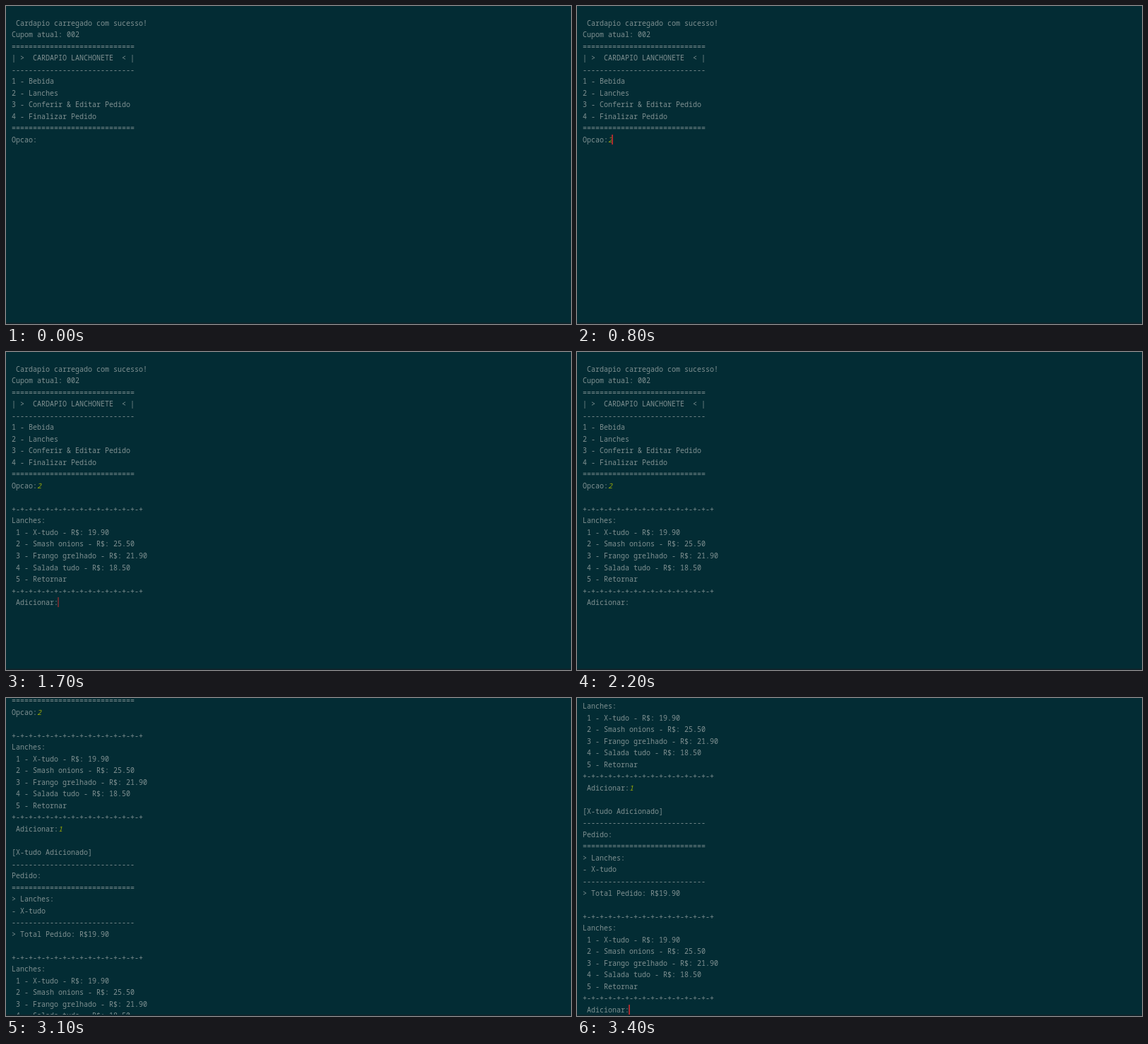
These frames come from a looping animation (800 by 450 pixels, 4000 ms). An HTML page:

```html
<!DOCTYPE html>
<html lang="pt">
<head>
<meta charset="utf-8">
<title>Cardapio</title>
<style>
  html, body { margin: 0; width: 100%; height: 100%; overflow: hidden; background: #032c34; }
  #view { position: absolute; left: 8px; top: 0; width: 792px; height: 450px; overflow: hidden; }
  #log {
    position: absolute; left: 0; margin: 0; color: #7f9091;
    font: 10px/16.53px "Noto Sans Mono", "DejaVu Sans Mono", monospace;
    font-variant-ligatures: none;
  }
  #log i { color: #98a808; }
  #caret { position: absolute; width: 2px; height: 14px; background: #a82c30; }
  #edge { position: absolute; left: 0; top: 448px; width: 800px; height: 2px; background: #10242b; }
</style>
</head>
<body>
<div id="view"><pre id="log"></pre><div id="caret"></div></div>
<div id="edge"></div>
<script>
const LOOP = 4000, ROW = 16.53, COL = 6, TOP = 15.5;
const log = document.getElementById('log');
const caret = document.getElementById('caret');

const double = '='.repeat(29), single = '-'.repeat(29), plus = '+-'.repeat(15) + '+';
const typed = key => `<i>${key}</i>`;

const menu = ` Cardapio carregado com sucesso!
Cupom atual: 002
${double}
| &gt;  CARDAPIO LANCHONETE  &lt; |
${single}
1 - Bebida
2 - Lanches
3 - Conferir &amp; Editar Pedido
4 - Finalizar Pedido
${double}
Opcao:`;

const snacks = `

${plus}
Lanches:
 1 - X-tudo - R$: 19.90
 2 - Smash onions - R$: 25.50
 3 - Frango grelhado - R$: 21.90
 4 - Salada tudo - R$: 18.50
 5 - Retornar
${plus}
 Adicionar:`;

const order = `

[X-tudo Adicionado]
${single}
Pedido:
${double}
&gt; Lanches:
- X-tudo
${single}
&gt; Total Pedido: R$19.90`;

const chosen = menu + typed(2);
const listed = chosen + snacks;
const added = listed + typed(1);
const full = added + order + snacks;

// Each step: start time, text, caret [row, column, opacity], scroll offset
const steps = [
  [0, menu],
  [100, menu, [10, 6, 1]],
  [700, chosen, [10, 7, 1]],
  [1400, chosen, [11, 0, 0.6]],
  [1500, chosen, [11, 0, 0.8]],
  [1700, listed, [20, 11, 0.6]],
  [1800, listed, [20, 11, 1]],
  [2200, listed],
  [2500, added, [20, 12, 1]],
  [2800, added, [21, 0, 0.6]],
  [2900, added, [21, 0, 0.8]],
  [3100, full, null, 169.2],
  [3200, full, [39, 11, 0.6], 227.4],
  [3300, full, [39, 11, 1], 227.4]
];

let shown;
function draw() {
  const time = performance.now() % LOOP;
  const step = steps.findLast(([start]) => start <= time);
  if (step !== shown) {
    shown = step;
    const [, text, position, scroll = 0] = step;
    const [row, column, opacity] = position || [0, 0, 0];
    log.innerHTML = text;
    log.style.top = TOP - scroll + 'px';
    caret.style.left = column * COL - 1 + 'px';
    caret.style.top = Math.round(TOP + row * ROW - scroll + 1) + 'px';
    caret.style.opacity = opacity;
  }
  requestAnimationFrame(draw);
}
draw();
</script>
</body>
</html>
```
